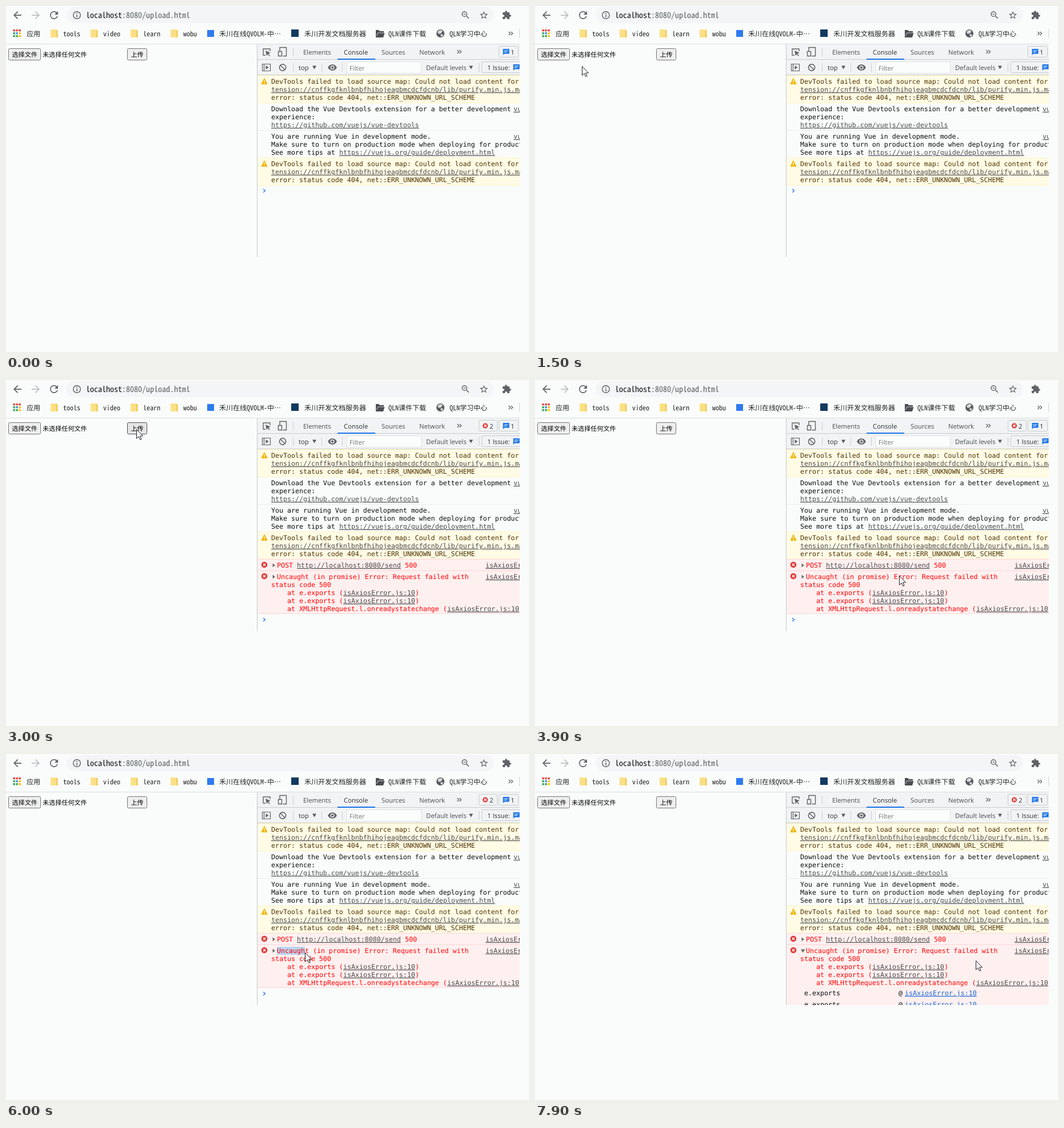
An HTML page that plays this animation: 915x605 px, repeating every 8000 ms.

```html
<!DOCTYPE html>
<html lang="zh">
<head>
<meta charset="utf-8">
<title>Upload page with console</title>
<style>
  html, body { margin: 0; width: 100%; height: 100%; overflow: hidden; background: #fafcfb; }
  svg { display: block; width: 100%; height: 100%; }
  text { white-space: pre; text-rendering: geometricPrecision; }
  .mono { font: 11.627px "DejaVu Sans Mono", monospace; }
  .ui { font: 11.3px "Open Sans", sans-serif; }
  .cjk { font: 500 11.1px "Noto Sans CJK SC", "Noto Sans CJK", sans-serif; }
  .mark { font: 12px "Noto Sans Mono CJK SC", "Noto Sans CJK SC", monospace; }
  .address { font: 14px "Noto Sans Mono CJK SC", "Noto Sans CJK SC", monospace; }
  .link { text-decoration: underline; }
</style>
</head>
<body>
<svg id="stage" viewBox="0 0 915 605"></svg>
<script>
const LOOP = 8000, STEP = 100;
const GREY = '#5f6368', BLUE = '#1a73e8', RED = '#f00', LINK = '#4c4c4c', INK = '#0c0c0c', WARN = '#4f3400';
const WARN_EDGE = '#fff5c2', FAIL_EDGE = '#ffd6d6';

const rect = (x, y, w, h, fill, more = '') =>
  `<rect x="${x}" y="${y}" width="${w}" height="${h}" fill="${fill}" ${more}/>`;
const box = (x, y, w, h, fill, stroke, r = 2, more = '') =>
  rect(x + .5, y + .5, w - 1, h - 1, fill, `stroke="${stroke}" rx="${r}" ${more}`);
const path = (d, fill, more = '') => `<path d="${d}" fill="${fill}" ${more}/>`;
const line = (d, stroke, w = 1, more = '') => path(d, 'none', `stroke="${stroke}" stroke-width="${w}" ${more}`);
const circle = (x, y, r, fill, more = '') => `<circle cx="${x}" cy="${y}" r="${r}" fill="${fill}" ${more}/>`;
const text = (cls, x, y, s, fill, more = '') =>
  `<text class="${cls}" x="${x}" y="${y}" fill="${fill}" ${more}>${s}</text>`;
const mono = (x, y, s, fill = INK) => text('mono', x, y, s, fill);
const link = (x, y, s, fill = LINK) => text('mono link', x, y, s, fill);
const ui = (x, y, s, fill = '#4a4e52') => text('ui', x, y, s, fill);
const mark = (x, s) => text('mark', x, 52.5, s, '#222');
const icon = (cx, cy, size, d, fill = GREY) =>
  `<g transform="translate(${cx - size / 2} ${cy - size / 2}) scale(${size / 24})">${path(d, fill, 'fill-rule="evenodd"')}</g>`;
const group = (id, s, more = '') => `<g id="${id}" ${more}>${s}</g>`;

const ARROW = 'M20 11H7.83l5.59-5.59L12 4l-8 8 8 8 1.41-1.41L7.83 13H20z';
const RELOAD = 'M17.65 6.35A7.96 7.96 0 0 0 12 4a8 8 0 1 0 7.73 10h-2.08A6 6 0 1 1 12 6c1.66 0 3.14.69 4.22 1.78L13 11h7V4z';
const ZOOM = 'M15.5 14h-.79l-.28-.27A6.47 6.47 0 0 0 16 9.5 6.5 6.5 0 1 0 9.5 16c1.61 0 3.09-.59 4.23-1.57l.27.28v.79l5 4.99L20.49 19zm-6 0a4.5 4.5 0 1 1 0-9 4.5 4.5 0 0 1 0 9zM7 8.8h5v1.4H7z';
const STAR = 'M22 9.24l-7.19-.62L12 2 9.19 8.63 2 9.24l5.46 4.73L5.82 21 12 17.27 18.18 21l-1.63-7.03zM12 15.4l-3.76 2.27 1-4.28-3.32-2.88 4.38-.38L12 6.1l1.71 4.04 4.38.38-3.32 2.88 1 4.28z';
const PUZZLE = 'M20.5 11H19V7c0-1.1-.9-2-2-2h-4V3.5a2.5 2.5 0 0 0-5 0V5H4c-1.1 0-2 .9-2 2v3.8h1.5a2.7 2.7 0 0 1 0 5.4H2V20c0 1.1.9 2 2 2h3.8v-1.5a2.7 2.7 0 0 1 5.4 0V22H17c1.1 0 2-.9 2-2v-4h1.5a2.5 2.5 0 0 0 0-5z';
const EYE = 'M12 4.5C7 4.5 2.73 7.61 1 12c1.73 4.39 6 7.5 11 7.5s9.27-3.11 11-7.5c-1.73-4.39-6-7.5-11-7.5zM12 17a5 5 0 1 1 0-10 5 5 0 0 1 0 10zm0-8a3 3 0 1 0 0 6 3 3 0 0 0 0-6z';

const chat = (x, y) => path(`M${x} ${y}h11v8.5h-8.5l-2.5 2.5z`, BLUE) +
  line(`M${x + 2} ${y + 3}h7M${x + 2} ${y + 5.5}h5`, '#fff');
const divider = (x, y) => line(`M${x + .5} ${y}v15`, '#cbcdd0');
const rule = (y, stroke) => line(`M440 ${y + .5}H899`, stroke);
const down = (x, y) => path(`M${x} ${y}h7l-3.5 6z`, '#5a5a5a');
const more = (x, y) => line(`M${x} ${y - 3}l3 3-3 3m4-6l3 3-3 3`, GREY, 1.3);
const folder = x => path(`M${x} 41h10l2.5 2v12h-12.5z`, '#fbdf86') +
  path(`M${x + 10} 41l2.5 2v12h-2.5z`, '#f0cb62');
const failIcon = (x, y, r = 5.3) => circle(x, y, r, '#df3d3d') +
  line(`M${x - 2} ${y - 2}l4 4m0-4l-4 4`, '#fff', 1.3);
const warnIcon = y => path(`M452 ${y}l5 10h-10z`, '#f0b400', 'stroke="#f0b400" stroke-linejoin="round"') +
  line(`M452 ${y + 3}v4m0 1v1.4`, '#fff', 1.3);
const prompt = (id, y) => group(id, line(`M450 ${y - 3}l3.5 3-3.5 3`, '#367cf1', 1.5));

function browser() {
  const dots = ['#ea4335', '#ea4335', '#ea4335', '#34a853', '#4285f4', '#fbbc05', '#34a853', '#34a853', '#fbbc05'];
  return rect(106, 2, 747, 28, '#f3f5f6', 'rx="14"') +
    icon(20, 16, 21, ARROW) +
    `<g transform="rotate(180 52 16)">${icon(52, 16, 21, ARROW, '#bcc0c3')}</g>` +
    icon(84, 16, 21, RELOAD) +
    circle(124, 16, 6.3, 'none', `stroke="${GREY}" stroke-width="1.4"`) +
    line('M124 12.3v1.6m0 1.3v4.6', GREY, 1.5) +
    text('address', 140, 21, 'localhost<tspan fill="#5a5e62">:8080/upload.html</tspan>', '#111') +
    icon(804, 16, 18, ZOOM) + icon(836, 16, 17, STAR) + icon(876, 16, 17, PUZZLE) +
    dots.map((c, i) => rect(12.5 + i % 3 * 5, 41 + (i / 3 | 0) * 5, 3.4, 3.4, c)).join('') +
    mark(36, '应用') +
    ['tools', 'video', 'learn', 'wobu'].map((s, i) => folder(78 + 70 * i) + mark(100 + 70 * i, s)).join('') +
    rect(352, 42, 12, 12, '#2f7bf0') + mark(373, '禾川在线QVOLM-中⋯') +
    rect(499, 41, 13, 13, '#12395f') + mark(522, '禾川开发文档服务器') +
    path('M647 42h5l2 2h7v3h1.5l-2.5 8h-13z', '#4b4e51') + line('M648.5 52l2-5h11', '#c9cccd') +
    mark(669, 'QLN课件下载') +
    circle(760, 48, 7, '#55595d') + path('M757 43l4-1 3 2-3 4-4 1-2-3zM761 49l4 1-2 4-3-2z', '#d6d9da') +
    mark(776, 'QLN学习中心') + more(879.5, 48) +
    line('M898.5 40v16', '#cfd2d4') + line('M0 66.5H899', '#dcdfe1');
}

function page() {
  return box(4, 74, 57, 21, '#efefef', '#767676') + text('cjk', 10.5, 88.5, '选择文件', '#000') +
    text('cjk', 64, 88.5, '未选择任何文件', '#000') +
    box(212, 74, 35, 21, '#efefef', '#767676', 2, 'id="upload"') + text('cjk', 218.5, 88.5, '上传', '#000');
}

function toolbar() {
  return rect(440, 67, 459, 54, '#f1f3f4') + rule(93, '#cbcdd0') + rule(120, '#cbcdd0') +
    rect(580, 92, 66, 2, BLUE) +
    line('M454 86h-4v-11h12v4', GREY, 1.4) + path('M454 78l9 4-4 1.2 3 3.5-1.3 1-2.7-3.5-2 3z', GREY) +
    line('M479 79v-6.5h11.5v15h-6M476.5 79.5h6v8h-6z', GREY, 1.4) +
    divider(502, 73) +
    ui(520, 85, 'Elements') + ui(591, 85, 'Console', '#2b2e31') + ui(657, 85, 'Sources') + ui(723, 85, 'Network') +
    more(789.5, 80) +
    group('badge', box(827, 70, 33, 20, '#f1f3f4', '#c8cbce') + failIcon(838.5, 80, 4.6) + ui(846, 84.5, '2', '#333')) +
    box(862, 70, 35, 20, '#f1f3f4', '#c8cbce') + chat(869.5, 75) + ui(883, 84.5, '1', '#333') +
    line('M448.5 101.5h14v12h-14zM451.5 101.5v12', GREY, 1.2) + path('M454.5 104v7l5-3.5z', GREY) +
    circle(484, 107.5, 5.6, 'none', `stroke="${GREY}" stroke-width="1.6"`) + line('M480 103.5l8 8', GREY, 1.6) +
    divider(502, 100) + ui(512, 112, 'top', '#333') + down(536, 104.5) +
    divider(552, 100) + icon(571, 107.5, 17, EYE) + divider(588, 100) +
    box(596, 97, 131, 21, '#fbfdfd', '#e0e2e4', 0) + ui(601, 112.5, 'Filter', '#757575') +
    ui(735, 112, 'Default levels') + down(810, 104.5) + divider(827, 100) +
    box(832, 97, 70, 20, '#f1f3f4', '#c8cbce') + ui(842, 112, '1 Issue:', '#333') + chat(887.5, 102);
}

const warning = y => rect(440, y, 459, 49, '#fffbe5') + rule(y, WARN_EDGE) + rule(y + 48, WARN_EDGE) +
  warnIcon(y + 5.5) +
  mono(464, y + 15, 'DevTools failed to load source map: Could not load content for', WARN) +
  link(464, y + 29, 'tension://cnffkgfknlbnbfhihojeagbmcdcfdcnb/lib/purify.min.js.map') +
  mono(464, y + 43, 'error: status code 404, net::ERR_UNKNOWN_URL_SCHEME', WARN);

function messages() {
  return warning(121) + warning(265) + rule(217, '#eceeee') +
    mono(464, 184, 'Download the Vue Devtools extension for a better development') + link(888, 184, 'vue.js') +
    mono(464, 198, 'experience:') + link(464, 212, 'https://github.com/vuejs/vue-devtools') +
    mono(464, 232, 'You are running Vue in development mode.') + link(888, 232, 'vue.js') +
    mono(464, 246, 'Make sure to turn on production mode when deploying for production.') +
    mono(464, 260, 'See more tips at') + link(583, 260, 'https://vuejs.org/guide/deployment.html');
}

function errors() {
  const file = 'isAxiosError.js:10';
  const frame = y => mono(492, y, 'at e.exports (', RED) + link(590, y, file) + mono(716, y, ')', RED);
  const trace = y => mono(471, y, 'e.exports') + mono(636, y, '@') + link(647, y, file, '#1a66d6');
  return rect(440, 313, 459, 96, '#fff0f0') + rule(313, FAIL_EDGE) + rule(333, FAIL_EDGE) +
    failIcon(452, 323) + path('M466.5 320.5v7l4.5-3.5z', '#6e6e6e') +
    mono(474, 328, 'POST', RED) + link(509, 328, 'http://localhost:8080/send') + mono(698, 328, '500', RED) +
    link(839, 328, file) + failIcon(452, 343) +
    rect(474, 337, 0, 14, '#b9d6f2', 'id="sel1"') + rect(464, 351, 105, 14, '#b9d6f2', 'id="sel2"') +
    mono(474, 348, 'Uncaught (in promise) Error: Request failed with', RED) + link(839, 348, file) +
    mono(464, 362, 'status code 500', RED) + frame(376) + frame(390) +
    mono(492, 404, 'at XMLHttpRequest.l.onreadystatechange (', RED) + link(772, 404, file) +
    group('closed', path('M466.5 340.5v7l4.5-3.5z', '#6e6e6e') + rule(408, FAIL_EDGE)) +
    group('open', path('M465 341.5h7.5l-3.75 6z', '#6e6e6e') + rect(440, 408, 459, 31, '#fff0f0') +
      trace(422) + trace(442));
}

const stage = document.getElementById('stage');
stage.innerHTML = `<clipPath id="panel"><rect x="439" y="66" width="460" height="373"/></clipPath>` +
  rect(0, 0, 915, 605, '#fafcfb') + browser() + page() +
  group('devtools', toolbar() + messages() + prompt('prompt1', 323) + group('errors', errors()) +
    prompt('prompt2', 419) + line('M439.5 67V439', '#c6c9cb'), 'clip-path="url(#panel)"') +
  group('cursor', path('M.5 .5V16.3L4.2 12.9 6.7 18.4 9 17.4 6.6 12H11.5Z', '#fff', 'stroke="#1c1c24"'));

const $ = id => document.getElementById(id);
const show = (id, on) => $(id).setAttribute('visibility', on ? 'inherit' : 'hidden');

// Pointer stops: time, x, y
const stops = [
  [0, 805, 83], [200, 805, 83], [300, 878, 92], [400, 660, 100], [600, 226, 93], [700, 38, 66],
  [1100, 29, 129], [1200, 28, 125], [1600, 100, 98], [1800, 175, 78], [2000, 210, 90], [2300, 228, 86],
  [3400, 228, 86], [3500, 240, 94], [3800, 690, 338], [3900, 637, 342], [4300, 520, 334],
  [4400, 524, 332], [4600, 508, 328], [4800, 492, 333], [4900, 499, 334], [5000, 499, 334],
  [5100, 503, 340], [5300, 473, 348], [5500, 478, 346], [5600, 478, 346], [5800, 498, 346],
  [5900, 498, 346], [6500, 650, 349], [6700, 677, 352], [6800, 690, 356], [7500, 771, 360],
  [7800, 771, 361], [8000, 771, 361]
];

function pointer(t) {
  const i = stops.findIndex(s => s[0] > t);
  const [a, ax, ay] = stops[i - 1], [b, bx, by] = stops[i];
  const k = (t - a) / (b - a);
  return [Math.round(ax + (bx - ax) * k), Math.round(ay + (by - ay) * k)];
}

function draw(ms) {
  const t = Math.floor(ms % LOOP / STEP) * STEP;
  const [x, y] = pointer(t);
  $('cursor').setAttribute('transform', `translate(${x} ${y})`);
  show('cursor', t >= 100);

  const over = x >= 212 && x < 247 && y >= 74 && y < 95;
  const pressed = t >= 2600 && t < 2900;
  $('upload').setAttribute('fill', pressed ? '#f5f5f5' : over ? '#e5e5e5' : '#efefef');
  $('upload').setAttribute('stroke', pressed ? '#8d8d8d' : over ? '#4f4f4f' : '#767676');

  const failed = t >= 3000, open = t >= 7800;
  show('badge', failed);
  show('errors', failed);
  show('prompt1', !failed);
  show('prompt2', failed && !open);
  show('closed', failed && !open);
  show('open', open);

  // Dragging below the first line selects all of it and the second one.
  const selecting = t >= 5700 && t < 7700;
  const both = selecting && (t > 6800 || y > 350);
  $('sel1').setAttribute('width', both ? 350 : selecting ? Math.round((x - 474) / 7) * 7 : 0);
  show('sel2', both);
}

const start = performance.now();
function tick() {
  draw(performance.now() - start);
  requestAnimationFrame(tick);
}
tick();
</script>
</body>
</html>
```
